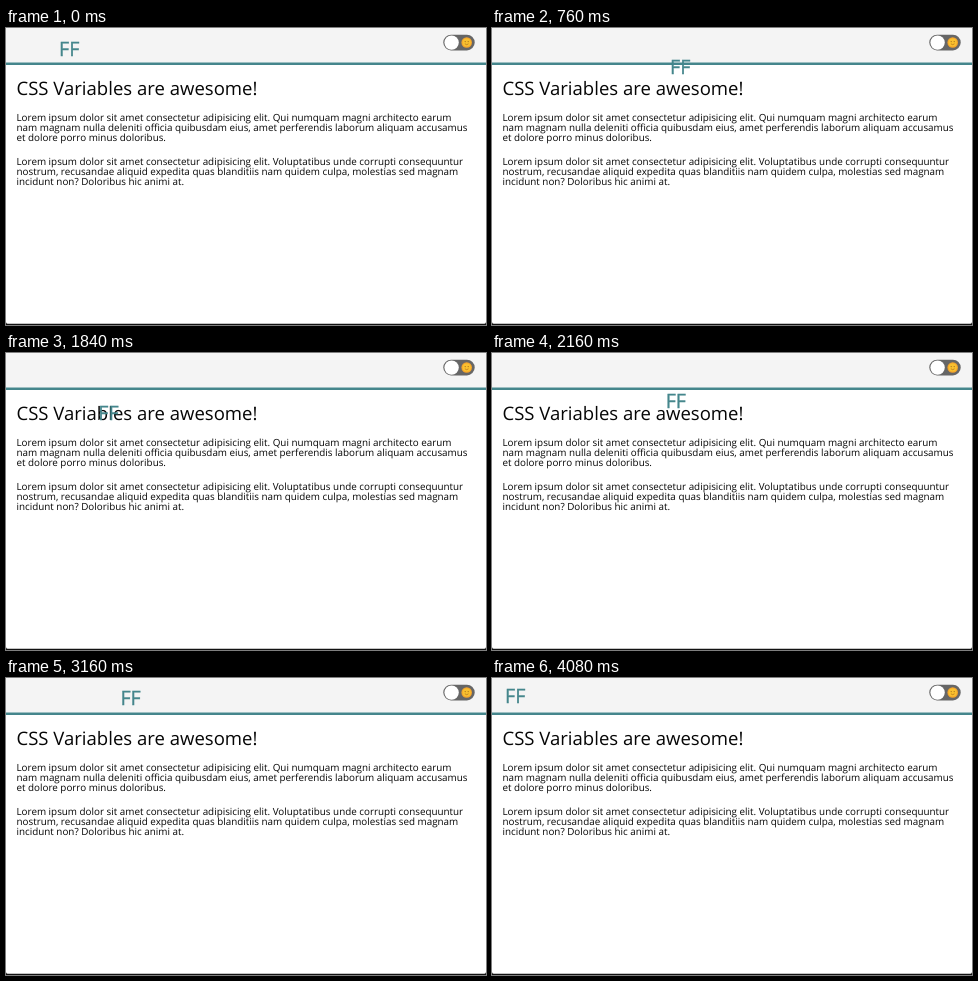
An HTML page that plays this animation: 480x297 px, repeating every 4.64 s.

```html
<!DOCTYPE html>
<html lang="en">
<head>
<meta charset="utf-8">
<title>CSS Variables</title>
<style>
  html, body { margin: 0; width: 100%; height: 100%; overflow: hidden; background: #fff; }
  svg { display: block; width: 480px; height: 297px; }
  text {
    font-family: "Open Sans", sans-serif;
    font-size: 9.86px;
    fill: #060606;
    text-rendering: geometricPrecision;
  }
  .title { font-size: 18.54px; }
  .logo { font-size: 19.7px; fill: #45868c; stroke: #45868c; stroke-width: .35px; }
</style>
</head>
<body>
<svg viewBox="0 0 480 297">
  <rect width="480" height="297" fill="#111"/>
  <path d="M0 0H480V294Q480 295.7 478.5 295.7H1.5Q0 295.7 0 294Z" fill="#fff"/>
  <rect width="480" height="34.5" fill="#f4f4f4"/>
  <rect y="34.5" width="480" height="2.5" fill="#45868c"/>

  <rect x="437.3" y="6.8" width="31.4" height="15.6" rx="7.8" fill="#666"/>
  <circle cx="445.6" cy="14.6" r="7.2" fill="#fff"/>
  <g>
    <circle cx="460.7" cy="14.5" r="5.3" fill="#f3a32b"/>
    <circle cx="460.7" cy="14.5" r="4.1" fill="#f9c02f"/>
    <circle cx="459.2" cy="13.6" r=".6" fill="#a06a1c"/>
    <circle cx="462.2" cy="13.6" r=".6" fill="#a06a1c"/>
    <path d="M458.9 15.8Q460.7 17.6 462.5 15.8" fill="none" stroke="#b0701c" stroke-width=".7"/>
  </g>

  <text class="title" x="10.5" y="66.8">CSS Variables are awesome!</text>
  <text y="93">
    <tspan x="10.5">Lorem ipsum dolor sit amet consectetur adipisicing elit. Qui numquam magni architecto earum</tspan>
    <tspan x="10.5" dy="10">nam magnam nulla deleniti officia quibusdam eius, amet perferendis laborum aliquam accusamus</tspan>
    <tspan x="10.5" dy="10">et dolore porro minus doloribus.</tspan>
  </text>
  <text y="137">
    <tspan x="10.5">Lorem ipsum dolor sit amet consectetur adipisicing elit. Voluptatibus unde corrupti consequuntur</tspan>
    <tspan x="10.5" dy="10">nostrum, recusandae aliquid expedita quas blanditiis nam quidem culpa, molestias sed magnam</tspan>
    <tspan x="10.5" dy="10">incidunt non? Doloribus hic animi at.</tspan>
  </text>

  <text class="logo" id="logo" x="-1" y="7">FF</text>
</svg>
<script>
const LOOP = 4640, STEP = 40;
const ORBIT_END = 2240, TURN = 1480;
const logo = document.getElementById('logo');

const easeIn = u => u ** 1.5;
const easeOut = u => Math.sin(u * Math.PI / 2);
const easeBoth = u => u * u * (3 - 2 * u);
const progress = (t, from, to) => Math.min(Math.max((t - from) / (to - from), 0), 1);
const mix = (a, b, u) => a.map((v, i) => v + (b[i] - v) * u);

// Moves back to the left once the circling is over.
const legs = [
  { from: 2240, to: 2560, end: [178, 19], ease: easeOut },
  { from: 2560, to: 2960, end: [126.5, 20.5], ease: easeIn },
  { from: 3120, to: 3640, end: [34.5, 18], ease: easeOut },
  { from: 3680, to: 4080, end: [14, 18], ease: easeOut }
];

// A tilted ellipse, run faster across the top left.
function orbit(t) {
  const rush = 0.5 * Math.exp(-(((t - 1290) / 200) ** 2));
  const angle = (ORBIT_END - t) / TURN * 2 * Math.PI - rush;
  return [103 + 76 * Math.cos(angle), 31 + 31 * Math.sin(angle + 0.26)];
}

function position(t) {
  const circling = orbit(Math.min(t, ORBIT_END));
  const start = mix([54, 21], circling, easeBoth(progress(t, 0, 400)));
  return legs.reduce((p, leg) => mix(p, leg.end, leg.ease(progress(t, leg.from, leg.to))), start);
}

function draw(now) {
  const t = Math.floor(now % LOOP / STEP) * STEP;
  logo.setAttribute('transform', `translate(${position(t)})`);
}

const start = performance.now();
function tick() {
  draw(performance.now() - start);
  requestAnimationFrame(tick);
}
tick();
</script>
</body>
</html>
```
